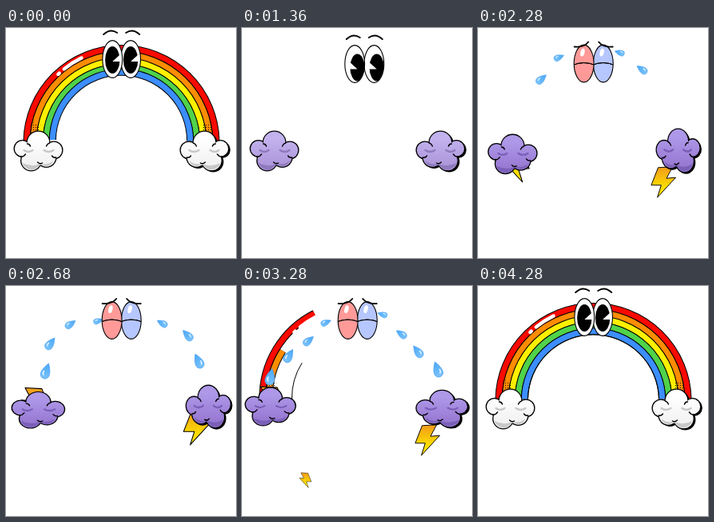
Animation, 288 px wide and 288 px high, one loop 5120 ms. Source, as an HTML page:

```html
<!DOCTYPE html>
<html lang="en">
<head>
<meta charset="utf-8">
<title>Rainbow mood</title>
<style>
html, body { margin: 0; width: 100%; height: 100%; overflow: hidden; background: #fff; }
svg { display: block; width: 100%; height: 100%; }
</style>
</head>
<body>
<svg viewBox="0 0 288 288">
  <defs>
    <linearGradient id="bolt" x1="0" y1="0" x2="0" y2="1">
      <stop offset="0" stop-color="#f29a1c"/><stop offset=".65" stop-color="#fbdc00"/>
    </linearGradient>
    <linearGradient id="water" x1="0" y1="0" x2="0" y2="1">
      <stop offset="0" stop-color="#49a8f7"/><stop offset="1" stop-color="#7cc4fb"/>
    </linearGradient>
    <pattern id="dots" width="3" height="3" patternUnits="userSpaceOnUse">
      <circle cx="1.5" cy="1.5" r=".6"/>
    </pattern>
  </defs>
  <g id="scene" stroke-linejoin="round"></g>
</svg>
<script>
const LOOP = 5120, MID = 144.5, BASE = 140;
const scene = document.getElementById('scene');
const clamp = (v, lo, hi) => Math.max(lo, Math.min(hi, v));
const mix = (a, b, u) => a + (b - a) * u;
const mixAll = (a, b, u) => a.map((v, i) => mix(v, b[i], u));
const blend = (a, b, u) => `rgb(${mixAll(a, b, u).map(Math.round)})`;
const ramp = (p, from, to) => {
  const u = clamp((p - from) / (to - from), 0, 1);
  return u * u * (3 - 2 * u);
};
// Rises over a..b and falls over c..d.
const phase = (p, a, b, c, d) => ramp(p, a, b) - ramp(p, c, d);
const repeat = (n, make) => Array.from({ length: n }, (_, i) => make(i)).join('');
const stroke = (d, color, width) =>
  `<path d="${d}" fill="none" stroke="${color}" stroke-width="${width}" stroke-linecap="round"/>`;

// Twelve poses a second, snapped to a 40 ms clock.
function poseAt(ms) {
  if (ms < 200) return 0;
  const tick = Math.floor((ms - 200) / 40) * 40;
  return Math.min(50, Math.ceil((tick + 35) / (1000 / 12)));
}

// Angles run in degrees from the left foot to the right one.
function polar(r, deg) {
  const a = deg * Math.PI / 180;
  return [MID - r * Math.cos(a), BASE - r * Math.sin(a)];
}

function arc(r, [from, to], color, width, cap = 'butt') {
  if (to - from < 0.5) return '';
  return `<path d="M${polar(r, from)}A${r} ${r} 0 0 1 ${polar(r, to)}" fill="none"
    stroke="${color}" stroke-width="${width}" stroke-linecap="${cap}"/>`;
}

const BANDS = ['#fa0a00', '#ff8c00', '#fff000', '#50d24a', '#3c8eff'];

// The inner bands leave first and return last.
function span(p, i) {
  const sweep = start => clamp((p - start) * 28, -1, 181);
  return p < 30 ? [sweep(3.8 - 0.95 * i), 181] : [-1, sweep(35.75 + 1.1 * i)];
}

function rainbow(p) {
  const within = (i, from, to) => {
    const [a, b] = span(p, i);
    return [Math.max(a, from), Math.min(b, to)];
  };
  let out = BANDS.map((color, i) => {
    const r = 118.6 - i * 8.1;
    return arc(r, span(p, i), '#000', 9.1) + arc(r, span(p, i), color, 7.1);
  }).join('');
  if (p >= 30) out += arc(82, span(p, 1), '#000', 1);
  for (const foot of [3, 169]) out += arc(109, within(1, foot, foot + 8), 'url(#dots)', 12);
  return out + arc(114, within(0, 46, 47), '#fff', 4.4, 'round') + arc(114, within(0, 51, 64), '#fff', 4.4, 'round');
}

// Drops slide down the missing rainbow, each on its own radius.
function tears(p, side, first, seed) {
  return repeat(6, j => {
    const age = p - first - 3 * j;
    if (age < 0 || age > 12) return '';
    const deg = 79 - 6 * age, [x, y] = polar(104 + 10 * Math.sin(1.3 * j + seed), deg);
    const size = 0.5 + 0.035 * age;
    return `<g transform="translate(${MID + side * (MID - x)} ${y}) scale(${side} 1) rotate(${-deg}) scale(${-size} ${size})">
      <path d="M0-13Q7-2 6.5 4A6.5 6.5 0 0 1-6.5 4Q-7-2 0-13Z" fill="url(#water)" stroke="#4a9df0" stroke-width=".8"/>
      ${stroke('M-3 0Q-4 3-2 5', '#e2f4ff', 2)}</g>`;
  });
}

function bolts(p, side, first, gap) {
  return repeat(3, i => {
    const u = (p - first - gap * i) / 8.2;
    if (u < 0 || u > 1) return '';
    const drop = u * u, x = 108 - 45 * drop;
    return `<path transform="translate(${MID + side * x} ${148 + 100 * drop}) scale(${side} 1) scale(${1.1 - 0.7 * drop * drop})"
      d="M-7-19L12-20L4-5L16-6L-8 20L-3 4L-16 4Z" fill="url(#bolt)" stroke="#000"/>`;
  });
}

function eye(x, y, gaze, shut, id, lid) {
  const ball = '<ellipse rx="12.4" ry="23.4"';
  const seam = v => `M-14 ${v + 3}Q0 ${v - 3} 14 ${v + 3}`;
  const top = seam(mix(-28, -1, shut)), low = seam(mix(28, -1, shut));
  const flip = gaze[0] > 1.5 ? -1 : 1;
  return `<g transform="translate(${x} ${y})"><clipPath id="${id}">${ball}/></clipPath>${ball} fill="#fff"/>
    <g clip-path="url(#${id})">
      <g transform="translate(${gaze})"><ellipse rx="9.2" ry="17"/>
        <path transform="scale(${flip} 1)" d="M0 2L12-9V2Z" fill="#fff"/></g>
      <path d="${top}V-30H-14Z" fill="${lid}"/><path d="${low}V30H-14Z" fill="${lid}"/>
      ${stroke(top + low, '#000', 1)}
      <ellipse cx="-5" cy="-13" rx="2.5" ry="5" fill="#fff" transform="rotate(14)" opacity="${shut}"/>
    </g>${ball} fill="none" stroke="#000" stroke-width="1.1"/></g>`;
}

const CALM = [-22.5, -31, -14, -39, -5.5, -33], SAD = [-24, -21, -12, -20, -6.5, -27];

function face(p) {
  const shut = phase(p, 17, 21, 42, 46), left = phase(p, 4, 7, 9, 11), right = phase(p, 10, 15, 17, 22);
  const x = 144.7 + 8.6 * right;
  const y = 39 + 6 * ramp(p, 10, 15) - 2 * ramp(p, 24, 30) - 4 * ramp(p, 42, 47);
  const gap = 11.4 + 0.7 * phase(p, 10, 15, 42, 47);
  const gaze = [3.3 * right - 3 * left, 1 + 4.5 * left + 3.5 * right];
  const b = mixAll(CALM, SAD, shut);
  const brow = side => `<g transform="translate(${x} ${y}) scale(${side} 1)">
    ${stroke(`M${b[0]} ${b[1]}Q${b.slice(2)}`, '#000', 1.9)}</g>`;
  return eye(x + gap, y, gaze, shut, 'eyeR', '#b6c6ff') + eye(x - gap, y, gaze, shut, 'eyeL', '#ff9a98')
    + brow(1) + brow(-1);
}

const PUFFS = [[0, -10.5, 14.5], [-20, -3, 10.5], [19.5, -1, 11], [-9, 12, 13], [10, 8, 12.5], [0, 1, 15]];
const WHITE = [255, 255, 255];

function cloud(p, side, squash, sway) {
  const gloom = 0.75 * ramp(p, 8, 15) + 0.25 * ramp(p, 16, 22) - ramp(p, 40, 47);
  const storm = phase(p, 16, 21, 40, 47);
  const wave = start => storm * Math.sin(0.22 * (p - 22) + start);
  const wide = 1 + 0.1 * wave(squash), drift = wave(sway);
  const x = MID + side * (104 + storm + 4 * drift), y = 154 + 0.5 * storm - 3.5 * drift;
  const shade = blend([200, 200, 200], [122, 96, 184], gloom);
  const puffs = (grow, fill, dx = 0, dy = 0) => PUFFS.map(([cx, cy, r]) =>
    `<circle cx="${cx + dx}" cy="${cy + dy}" r="${r + grow}" fill="${fill}"/>`).join('');
  const id = 'sky' + (side + 1);
  return `<linearGradient id="${id}" gradientUnits="userSpaceOnUse" x1="0" y1="-26" x2="0" y2="26">
      <stop offset=".2" stop-color="${blend(WHITE, [174, 152, 232], gloom)}"/>
      <stop offset="1" stop-color="${blend([238, 238, 238], [146, 112, 204], gloom)}"/></linearGradient>
    <g transform="translate(${x} ${y}) scale(${-side * wide} ${1 / wide})">
    ${side > 0 ? puffs(0, '#000', -2, 1.5) : ''}${puffs(0.5, '#000')}${puffs(-0.8, `url(#${id})`)}
    <path d="M-20 15Q-8 21 2 16Q13 18 19 12Q17 19 9 19Q4 17 1 18Q-4 25-11 23Q-18 21-20 15Z" fill="${shade}"/>
    ${stroke('M-18-1Q-13 3-7-1', shade, 2.4)}${stroke('M7-1Q13 3 19-1', shade, 2.4)}
    ${stroke('M-22 7Q-19 8-16 4', '#000', 1.4)}${stroke('M-1 14Q2 17 5 15', '#000', 1.4)}
    ${stroke('M14-10Q11-9 10-6', '#000', 1.4)}${stroke('M-14-9Q-11-9-10-6', '#000', 1.4)}
    ${stroke('M17 6Q19 9 22 8', '#000', 1.4)}</g>`;
}

let shown = -1;
function draw(p) {
  if (p === shown) return;
  shown = p;
  scene.innerHTML = rainbow(p)
    + tears(p, -1, 21, -0.4) + tears(p, 1, 22, 0.3)
    + bolts(p, -1, 22, 8) + bolts(p, 1, 20.5, 6)
    + face(p) + cloud(p, -1, -0.8, -2.2) + cloud(p, 1, -2.8, -0.6);
}

const begin = performance.now();
function tick() {
  draw(poseAt((performance.now() - begin) % LOOP));
  requestAnimationFrame(tick);
}
tick();
</script>
</body>
</html>
```
